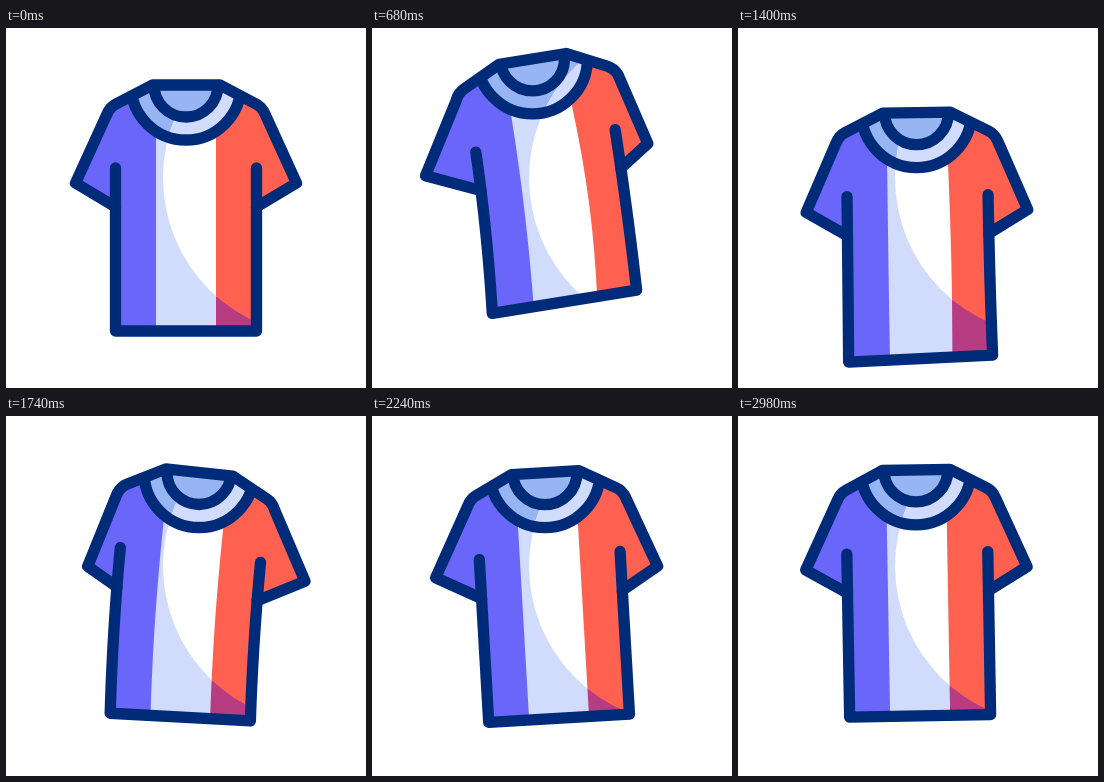
Recreate the animation shown at these times as an HTML page. Size 360 px wide and 360 px high, loop 3000 ms.

```html
<!DOCTYPE html>
<html lang="en">
<head>
<meta charset="utf-8">
<title>Bouncing shirt</title>
<style>
  html, body { margin: 0; width: 100%; height: 100%; overflow: hidden; background: #fff; }
  svg { display: block; width: 100%; height: 100%; }
  .line { fill: none; stroke: #002b79; stroke-width: 11.3; stroke-linecap: round; stroke-linejoin: round; }
</style>
</head>
<body>
<svg viewBox="0 0 360 360">
  <defs>
    <clipPath id="shirt"><path class="outline"/></clipPath>
    <clipPath id="light"><circle cx="315" cy="150" r="158"/></clipPath>
  </defs>
  <g clip-path="url(#shirt)">
    <path class="outline" fill="#6b66fa"/>
    <path class="middle" fill="#d1dcfd"/>
    <path class="right" fill="#b83c82"/>
    <circle class="neck" r="55" fill="#97b4f3"/>
    <g clip-path="url(#light)">
      <path class="middle" fill="#fff"/>
      <path class="right" fill="#ff6150"/>
      <circle class="neck" r="55" fill="#d1dcfd"/>
    </g>
    <circle class="neck" r="32" fill="#97b4f3"/>
    <circle class="neck line" r="32"/>
    <circle class="neck line" r="55"/>
  </g>
  <path class="outline line"/>
  <path class="arms line"/>
</svg>
<script>
const LOOP = 3000;
const CENTER = 180;

// Turning points of the fading bounce and sway; a sine ease joins them.
const bounce = [
  { at: 0, lift: 0 }, { at: 790, lift: -29 }, { at: 1435, lift: 28 }, { at: 1980, lift: -21 },
  { at: 2460, lift: 15 }, { at: 2850, lift: -10 }, { at: 3060, lift: 0 }
];
const sway = [
  { at: 180, turn: 0, bend: 0, twist: 0, flare: 0 },
  { at: 1050, turn: -14.8, bend: -11.5, twist: 0, flare: 0.06 },
  { at: 1640, turn: 7, bend: 8, twist: -3.2, flare: 0 },
  { at: 2170, turn: -3.6, bend: 0, twist: 0, flare: 0 },
  { at: 2600, turn: 1, bend: 0, twist: 0, flare: 0 },
  { at: 3000, turn: -1, bend: 0, twist: 0, flare: 0 }
];

function swing(stops, t) {
  const next = Math.max(1, stops.findIndex(stop => stop.at > t));
  const a = stops[next - 1], b = stops[next];
  const u = Math.max(0, (t - a.at) / (b.at - a.at));
  const ease = (1 - Math.cos(Math.PI * u)) / 2;
  const pose = {};
  for (const name in a) pose[name] = a[name] + (b[name] - a[name]) * ease;
  return pose;
}

const rad = deg => deg * Math.PI / 180;
const path = points => 'M' + points.map(p => p.join(' ')).join('L');

function setAll(selector, attributes) {
  for (const node of document.querySelectorAll(selector))
    for (const name in attributes) node.setAttribute(name, attributes[name]);
}

function draw(t) {
  const { lift } = swing(bounce, t);
  const { turn, bend, twist, flare } = swing(sway, t);
  const cos = Math.cos(rad(turn)), sin = Math.sin(rad(turn));

  // Moves a point of the resting shirt into the current pose; the hem lags and flares.
  const place = (x, y) => {
    const low = Math.max(0, (y - 110) / 193) ** 2;
    const dx = (x - CENTER) * (1 + flare * low), dy = y - CENTER;
    return [
      CENTER + dx * cos - dy * sin + bend * low,
      CENTER + dx * sin + dy * cos + lift + rad(twist) * low * dx
    ];
  };
  const edge = (x, from, to, swell = 0) =>
    Array.from({ length: 13 }, (_, i) => {
      const y = from + (to - from) * i / 12;
      return place(x + swell * Math.sin(Math.PI * (y - 80) / 260), y);
    });

  const cuff = (x, drag, droop) => {
    const [px, py] = place(x, 155);
    return [px + drag * turn, py + droop];
  };
  const leftCuff = cuff(69.5, 1.4, turn < 0 ? -0.27 * turn : 1.3 * turn);
  const rightCuff = cuff(290.5, 1, Math.max(0, -0.6 * turn));

  const shoulder = side => [[70, 76], [76, 79], [79, 86]]
    .map(([x, y]) => place(CENTER + side * x * (1 + flare), y));
  const curve = ([a, b, c]) => `L${a}Q${b} ${c}`;
  const outline = path([place(214, 57), place(146.5, 57)]) +
    curve(shoulder(-1)) +
    path([leftCuff, ...edge(109.5, 179, 303), ...edge(250.5, 303, 179), rightCuff]).replace('M', 'L') +
    curve(shoulder(1).reverse()) + 'Z';

  const swell = 120 * flare;
  const seam = edge(210, 40, 330, swell);
  const stripe = (left, right) => path([...left, ...right.slice().reverse()]) + 'Z';
  const [cx, cy] = place(180, 57);

  setAll('.outline', { d: outline });
  setAll('.middle', { d: stripe(edge(150, 40, 330), edge(211, 40, 330, swell)) });
  setAll('.right', { d: stripe(seam, edge(340, 40, 330)) });
  setAll('.neck', { cx, cy });
  setAll('.arms', { d: path(edge(109.5, 140, 180)) + path(edge(250.5, 140, 180)) });
}

const start = performance.now();
function tick() {
  draw((performance.now() - start) % LOOP);
  requestAnimationFrame(tick);
}
tick();
</script>
</body>
</html>
```
